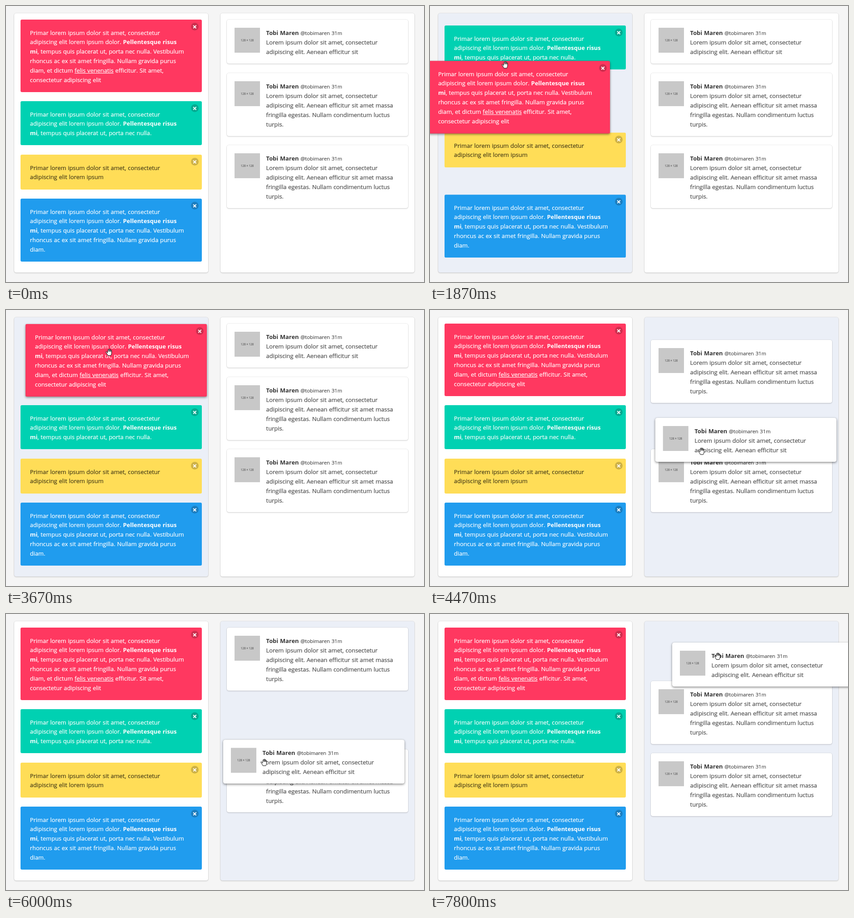
These frames come from a looping animation (920 px wide and 609 px high, 8 s). An HTML page:

```html
<!DOCTYPE html>
<html lang="en">
<head>
<meta charset="utf-8">
<title>Sortable cards</title>
<style>
  html, body { margin: 0; width: 100%; height: 100%; overflow: hidden; }
  body {
    position: relative; background: #f5f5f5; color: #4a4a4a;
    font: 12.87px/20.8px "Open Sans", "Noto Sans", sans-serif;
    word-spacing: .45px; white-space: nowrap; -webkit-text-stroke: .2px;
    --soft: 0 1.7px 2.6px rgba(10,10,10,.1), 0 0 0 .87px rgba(10,10,10,.1);
    --lifted: 0 2px 5px rgba(0,0,0,.45), 0 0 1px rgba(0,0,0,.3);
  }
  strong { -webkit-text-stroke: 0; }

  .column {
    position: absolute; top: 16px; width: 427px; height: 572px;
    border-radius: 4.3px; background: var(--bg); box-shadow: var(--soft);
  }
  .left { left: 18px; animation: left-active 8s infinite; }
  .right { left: 472px; animation: right-active 8s infinite; }

  .card {
    position: absolute; left: 14px; top: var(--top); box-sizing: border-box;
    width: 399px; height: var(--h); padding: 18.6px 20.8px; border-radius: 3px;
    animation: 8s infinite;
  }
  .ghost { z-index: 1; box-shadow: var(--lift); }
  .red { background: #ff3860; color: #fff; animation-name: drag-red; }
  .teal { background: #00d1b2; color: #fff; animation-name: shift-teal; }
  .yellow { background: #ffdd57; color: rgba(0,0,0,.7); animation-name: shift-yellow; }
  .blue { background: #209cee; color: #fff; animation-name: shift-blue; }

  .close {
    position: absolute; right: 6.9px; top: 6.9px; width: 17.3px; height: 17.3px;
    border-radius: 50%; background: rgba(10,10,10,.2);
  }
  .close::before, .close::after {
    content: ""; position: absolute; left: 4.33px; top: 7.8px;
    width: 8.67px; height: 1.73px; background: #fff; rotate: 45deg;
  }
  .close::after { rotate: -45deg; }

  .post { padding-left: 86.6px; border-radius: 4.3px; background: #fff; }
  .post:not(.ghost) { box-shadow: var(--soft); }
  .post strong { color: #363636; }
  .post small { font-size: 11.2px; }
  .post i {
    position: absolute; left: 17px; top: 18px; width: 56px; height: 55px;
    background: #c8c8c8; color: #666; text-align: center;
    font: 6.3px/56px "Open Sans", sans-serif; word-spacing: 0;
  }
  .first { animation-name: drag-post; }
  .second { animation-name: shift-second; }
  .third { animation-name: shift-third; }

  .cursor {
    position: absolute; z-index: 2; left: -8px; top: -9px; width: 16px; height: 16px;
    fill: #fff; stroke: #000; stroke-linejoin: round; animation: cursor 8s infinite;
  }

  @keyframes left-active {
    0%, 11.99%, 46.76%, 100% { --bg: #fff; --lift: none; }
    12%, 46.75% { --bg: #ebeff7; --lift: var(--lifted); }
  }
  @keyframes right-active {
    0%, 52.49% { --bg: #fff; --lift: var(--soft); }
    52.5%, 100% { --bg: #ebeff7; --lift: var(--lifted); }
  }

  @keyframes drag-red {
    0%, 12.5% { translate: 0 0; animation-timing-function: ease-in-out; }
    18.75% { translate: 8px 398px; animation-timing-function: ease-in; }
    23.375% { translate: -35px 92px; animation-timing-function: ease-out; }
    26% { translate: -24px 3px; animation-timing-function: ease-in-out; }
    34.1% { translate: -4px 287px; animation-timing-function: ease-in; }
    36.625% { translate: -1px 274px; animation-timing-function: cubic-bezier(.35,.4,.6,1); }
    42%, 46.75% { translate: 11px 1px; }
    49.9%, 100% { translate: 0 0; }
  }
  @keyframes shift-teal {
    0%, 13.75%, 26.25%, 27.5%, 42.2%, 100% { translate: 0 0; }
    16.88%, 23.125%, 30.63%, 39.1% { translate: 0 -180px; }
  }
  @keyframes shift-yellow {
    0%, 15.5%, 25.15%, 30.63%, 40.9%, 100% { translate: 0 0; }
    18.63%, 22.03%, 33.75%, 37.75% { translate: 0 -180px; }
  }
  @keyframes shift-blue {
    0%, 17.4%, 24.25%, 100% { translate: 0 0; }
    20.5%, 21.125% { translate: 0 -180px; }
  }

  @keyframes drag-post {
    0%, 52.9% { translate: 0 0; animation-timing-function: ease-in-out; }
    57.75% { translate: 14px 300px; animation-timing-function: ease-in; }
    62.5% { translate: 23px 108px; animation-timing-function: ease-out; }
    66.25%, 67.9% { translate: 15px -3px; animation-timing-function: ease-in; }
    75% { translate: -8px 247px; animation-timing-function: ease-out; }
    78.1% { translate: -9px 300px; animation-timing-function: ease-in-out; }
    87.5%, 90.6% { translate: 0 3px; animation-timing-function: ease-in-out; }
    97.5%, 100% { translate: 47px 33px; }
  }
  @keyframes shift-second {
    0%, 54.6%, 66.4%, 71.5%, 88.1%, 100% { translate: 0 0; }
    57.75%, 63.25%, 74.6%, 85% { translate: 0 -118px; }
  }
  @keyframes shift-third {
    0%, 56.5%, 63.375%, 74.75%, 84.4%, 100% { translate: 0 0; }
    59.6%, 60.25%, 77.875%, 81.25% { translate: 0 -118px; }
  }

  /* The pointer runs slightly ahead of the card it drags. */
  @keyframes cursor {
    0%, .8% { translate: 926px 615px; animation-timing-function: ease-in-out; }
    8% { translate: 188px 100px; animation-timing-function: ease-out; }
    10%, 12% { translate: 216px 93px; animation-timing-function: ease-in-out; }
    18.2% { translate: 224px 491px; animation-timing-function: ease-in; }
    23.375% { translate: 165px 131px; animation-timing-function: ease-out; }
    25.4% { translate: 192px 96px; animation-timing-function: ease-in-out; }
    33.5% { translate: 212px 380px; animation-timing-function: ease-in; }
    36.625% { translate: 201px 348px; animation-timing-function: cubic-bezier(.35,.4,.6,1); }
    41.4%, 46.75% { translate: 227px 94px; animation-timing-function: ease-in-out; }
    51.5%, 52.5% { translate: 586px 61px; animation-timing-function: ease-in-out; }
    57.2% { translate: 600px 361px; animation-timing-function: ease-in; }
    62.5% { translate: 610px 147px; animation-timing-function: ease-out; }
    65.6%, 67.3% { translate: 601px 58px; animation-timing-function: ease-in; }
    75% { translate: 568px 328px; animation-timing-function: ease-out; }
    77.4% { translate: 577px 361px; animation-timing-function: ease-in-out; }
    86.9%, 90% { translate: 586px 64px; animation-timing-function: ease-in-out; }
    97%, 100% { translate: 633px 94px; }
  }
</style>
</head>
<body>
  <div class="column left">
    <div class="card ghost red" style="--top:14px;--h:160px"><b class="close"></b>
      Primar lorem ipsum dolor sit amet, consectetur<br>
      adipiscing elit lorem ipsum dolor. <strong>Pellentesque risus<br>
      mi</strong>, tempus quis placerat ut, porta nec nulla. Vestibulum<br>
      rhoncus ac ex sit amet fringilla. Nullam gravida purus<br>
      diam, et dictum <u>felis venenatis</u> efficitur. Sit amet,<br>
      consectetur adipiscing elit
    </div>
    <div class="card teal" style="--top:194px;--h:97px"><b class="close"></b>
      Primar lorem ipsum dolor sit amet, consectetur<br>
      adipiscing elit lorem ipsum dolor. <strong>Pellentesque risus<br>
      mi</strong>, tempus quis placerat ut, porta nec nulla.
    </div>
    <div class="card yellow" style="--top:312px;--h:77px"><b class="close"></b>
      Primar lorem ipsum dolor sit amet, consectetur<br>
      adipiscing elit lorem ipsum
    </div>
    <div class="card blue" style="--top:409px;--h:139px"><b class="close"></b>
      Primar lorem ipsum dolor sit amet, consectetur<br>
      adipiscing elit lorem ipsum dolor. <strong>Pellentesque risus<br>
      mi</strong>, tempus quis placerat ut, porta nec nulla. Vestibulum<br>
      rhoncus ac ex sit amet fringilla. Nullam gravida purus<br>
      diam.
    </div>
  </div>

  <div class="column right">
    <div class="card post ghost first" style="--top:14px;--h:97px"><i>128 × 128</i>
      <strong>Tobi Maren</strong> <small>@tobimaren</small> <small>31m</small><br>
      Lorem ipsum dolor sit amet, consectetur<br>
      adipiscing elit. Aenean efficitur sit
    </div>
    <div class="card post second" style="--top:132px;--h:139px"><i>128 × 128</i>
      <strong>Tobi Maren</strong> <small>@tobimaren</small> <small>31m</small><br>
      Lorem ipsum dolor sit amet, consectetur<br>
      adipiscing elit. Aenean efficitur sit amet massa<br>
      fringilla egestas. Nullam condimentum luctus<br>
      turpis.
    </div>
    <div class="card post third" style="--top:291px;--h:139px"><i>128 × 128</i>
      <strong>Tobi Maren</strong> <small>@tobimaren</small> <small>31m</small><br>
      Lorem ipsum dolor sit amet, consectetur<br>
      adipiscing elit. Aenean efficitur sit amet massa<br>
      fringilla egestas. Nullam condimentum luctus<br>
      turpis.
    </div>
  </div>

  <svg class="cursor" viewBox="0 0 16 16">
    <path d="M4.5 9.5 2.6 7.2C1.6 6 .4 7 1 8.2L4 13c.6 1 1 1.5 1.2 2.5h6.6c.2-1.6 1.7-3 1.7-5.5V4.8c0-1.4-1.8-1.4-1.9 0V7 3c0-1.5-2-1.5-2 0v3.5V2c0-1.5-2-1.5-2 0v4.5V3c0-1.5-2-1.5-2 0z"/>
  </svg>
</body>
</html>
```
